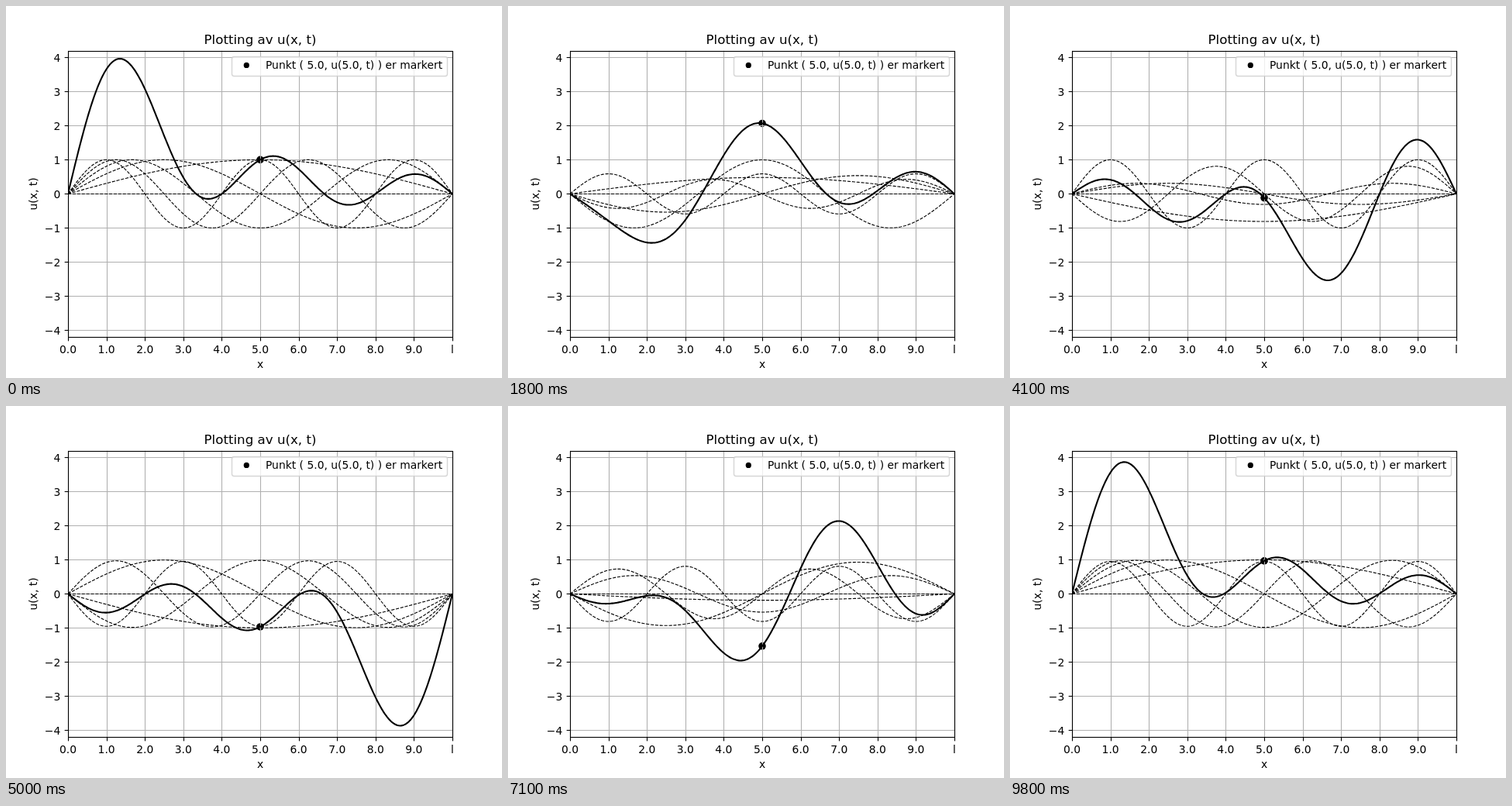
These frames come from a looping animation (640x480 px, 9900 ms). An HTML page with a canvas:

```html
<!DOCTYPE html>
<html lang="no">
<head>
<meta charset="utf-8">
<title>Plotting av u(x, t)</title>
<style>
  html, body { margin: 0; width: 100%; height: 100%; overflow: hidden; background: #fff; }
  canvas { display: block; }
</style>
</head>
<body>
<canvas id="plot" width="640" height="480"></canvas>
<script>
const ctx = document.getElementById('plot').getContext('2d');
const LOOP = 9900, STEP = 100, MODES = 5, SAMPLES = 300;
const box = { left: 80, right: 576, top: 57.6, bottom: 427.2 };
const PT = 100 / 72;
const THIN = 0.8 * PT;

const px = x => box.left + 49.6 * x;
const py = u => 242.4 - 44 * u;
const snap = v => Math.round(v) + 0.5;

function line(x1, y1, x2, y2) {
  ctx.beginPath();
  ctx.moveTo(x1, y1);
  ctx.lineTo(x2, y2);
  ctx.stroke();
}

function text(str, x, y, align = 'center', size = 10 * PT) {
  ctx.font = `${size}px "DejaVu Sans", sans-serif`;
  ctx.textAlign = align;
  ctx.fillText(str, x, y);
}

function dot(x, y, radius) {
  ctx.beginPath();
  ctx.arc(x, y, radius, 0, 2 * Math.PI);
  ctx.fill();
}

function curve(fn) {
  ctx.beginPath();
  for (let i = 0; i <= SAMPLES; i++) {
    const x = 10 * i / SAMPLES;
    ctx.lineTo(px(x), py(fn(x)));
  }
  ctx.stroke();
}

// The sweep jumps over two steps at the half period.
function phaseAt(ms) {
  const k = Math.max(0, Math.floor(ms / STEP) - 1);
  return (k < 50 ? k : k + 2) * 0.02 * Math.PI;
}

function drawGrid() {
  ctx.strokeStyle = '#b0b0b0';
  ctx.lineWidth = THIN;
  for (let i = 0; i <= 10; i++) line(snap(px(i)), box.top, snap(px(i)), box.bottom);
  for (let u = -4; u <= 4; u++) line(box.left, snap(py(u)), box.right, snap(py(u)));
}

function drawWaves(phase) {
  const mode = n => x => Math.cos(n * phase) * Math.sin(n * Math.PI * x / 10);
  const modes = Array.from({ length: MODES }, (_, i) => mode(i + 1));
  const total = x => modes.reduce((sum, f) => sum + f(x), 0);

  ctx.save();
  ctx.beginPath();
  ctx.rect(box.left, box.top, box.right - box.left, box.bottom - box.top);
  ctx.clip();
  ctx.fillStyle = '#000';
  dot(px(5), py(total(5)), 4.8);
  drawGrid();

  ctx.strokeStyle = '#000';
  ctx.lineJoin = 'round';
  ctx.setLineDash([3.7 * THIN, 1.6 * THIN]);
  line(box.left, snap(py(0)), box.right, snap(py(0)));
  modes.forEach(curve);
  ctx.setLineDash([]);
  ctx.lineWidth = 1.5 * PT;
  curve(total);
  ctx.restore();
}

function drawAxes() {
  const left = snap(box.left), right = snap(box.right);
  const top = snap(box.top), bottom = snap(box.bottom);
  ctx.strokeStyle = ctx.fillStyle = '#000';
  ctx.lineWidth = THIN;
  ctx.strokeRect(left, top, right - left, bottom - top);
  for (let i = 0; i <= 10; i++) {
    const x = snap(px(i));
    line(x, bottom, x, bottom + 4.86);
    text(i < 10 ? i.toFixed(1) : 'l', px(i), 448);
  }
  for (let u = -4; u <= 4; u++) {
    const y = snap(py(u));
    line(left, y, left - 4.86, y);
    text(String(u).replace('-', '\u2212'), 70.3, Math.round(py(u) + 5.1), 'right');
  }
  text('x', 328, 467);
  text('Plotting av u(x, t)', 328, 49, 'center', 12 * PT);
  ctx.save();
  ctx.translate(40, 242.4);
  ctx.rotate(-Math.PI / 2);
  text('u(x, t)', 0, 0);
  ctx.restore();
}

function drawLegend() {
  ctx.beginPath();
  ctx.roundRect(291.5, 65.5, 278, 25, 2.8);
  ctx.fillStyle = 'rgba(255,255,255,0.8)';
  ctx.fill();
  ctx.strokeStyle = 'rgba(204,204,204,0.8)';
  ctx.lineWidth = PT;
  ctx.stroke();
  ctx.fillStyle = '#000';
  dot(310.3, 76.4, 3.6);
  text('Punkt ( 5.0, u(5.0, t) ) er markert', 335, 81, 'left');
}

function render(now) {
  ctx.fillStyle = '#fff';
  ctx.fillRect(0, 0, 640, 480);
  drawWaves(phaseAt(now % LOOP));
  drawAxes();
  drawLegend();
}

const start = performance.now();
function tick() {
  render(performance.now() - start);
  requestAnimationFrame(tick);
}
tick();
</script>
</body>
</html>
```
